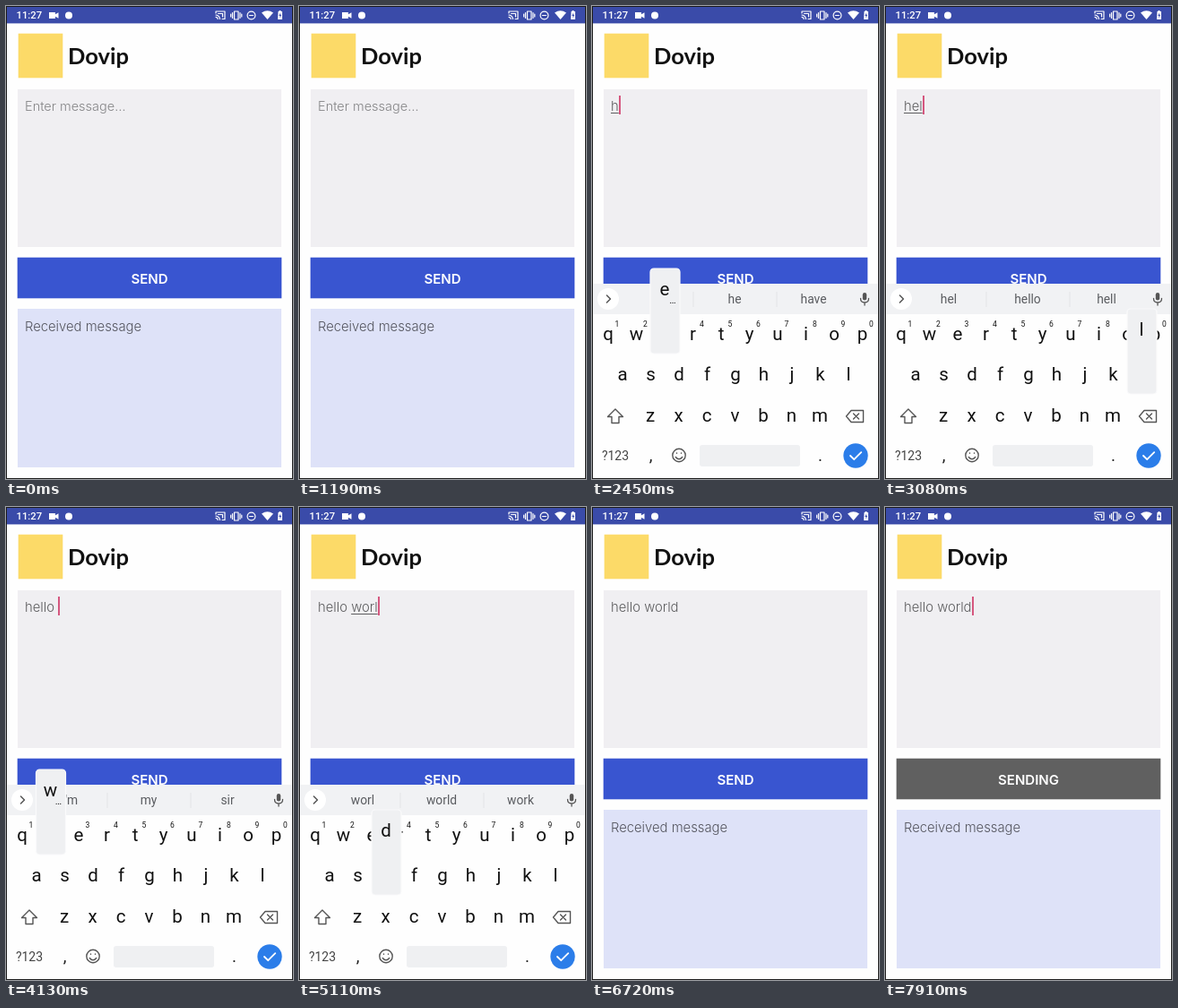
Animation of 320x528 px, one loop 8 s. Source, as an HTML page:

```html
<!DOCTYPE html>
<html lang="en">
<head>
<meta charset="utf-8">
<title>Message sender</title>
<style>
html, body { margin: 0; width: 100%; height: 100%; overflow: hidden; background: #fff; }
#stage { position: relative; width: 320px; height: 528px; overflow: hidden; background: #fefefe; }
svg { position: absolute; left: 0; top: 0; }
.app { font-family: Inter, sans-serif; font-size: 14.8px; font-weight: 300; }
#message { position: absolute; left: 21px; top: 102px; line-height: 20px; white-space: pre; color: #5c5c5e; }
#message u { text-underline-offset: 2px; text-decoration-thickness: 1px; }
#hint { position: absolute; left: 0; color: #858587; font-size: 14.5px; }
#caret { position: relative; }
#caret i { position: absolute; left: 0; top: -3px; width: 2px; height: 21px; background: #d5577f; }
.kb { font-family: Roboto, sans-serif; text-anchor: middle; }
.line { fill: none; stroke-linecap: round; stroke-linejoin: round; }
</style>
</head>
<body>
<div id="stage">
  <svg width="320" height="528">
    <rect width="320" height="19.400" fill="#3a4ba9"/>
    <text x="11.500" y="14" font-family="Roboto, sans-serif" font-size="11.300" font-weight="500" fill="#fff">11:27</text>
    <g fill="#fff">
      <path d="M48 7h7v2.300l3.500-2v6.400l-3.500-2v2.300h-7z"/>
      <circle cx="70" cy="10.500" r="4"/>
      <path d="M285 7.500q6.500-4.500 13 0L291.500 15z"/>
      <path d="M303.500 6h1V5h2v1h1.500v9h-5zM305.800 7.500l-1.500 3.500h1.200v2.500l1.700-3.700h-1.400z" fill-rule="evenodd"/>
    </g>
    <g class="line" stroke="#fff" stroke-width="1.200">
      <path d="M234 8V6h10v8.500h-3M234 10q4 .5 4.500 4.500M234 12.300q2 .2 2.200 2.200M236.500 8.500h5v3.500"/>
      <path d="M254.500 6h4.500v9h-4.500zM252.500 7.500v6M261 7.500v6M250.700 9v3M262.800 9v3"/>
      <circle cx="273.500" cy="10.500" r="4.400"/><path d="M271.500 10.500h4"/>
    </g>
    <rect x="13.700" y="30.700" width="49.600" height="49.600" fill="#fcda68"/>
    <text x="69" y="65" font-family="Lato, sans-serif" font-size="25.500" font-weight="700" fill="#111">Dovip</text>
    <rect x="13" y="93" width="294" height="176" fill="#f0eff2"/>
    <rect id="button" x="12.700" y="280.700" width="294.600" height="45.600"/>
    <text id="label" class="app" x="160" y="310" text-anchor="middle" style="font-weight:600;font-size:15px" fill="#fff"></text>
    <rect x="13" y="338" width="294" height="177" fill="#dee2f8"/>
    <text class="app" x="21" y="363" fill="#55565f">Received message</text>
  </svg>
  <div id="message" class="app"><span id="hint">Enter message…</span><span id="done"></span><u id="word"></u><span id="caret"><i></i></span></div>
  <svg width="320" height="528">
    <g id="keyboard" class="kb">
      <rect y="310" width="320" height="260" fill="#fefefe"/>
      <rect y="310" width="320" height="34" fill="#f1f2f4"/>
      <path d="M113 319v17M206 319v17" stroke="#e3e4e7"/>
      <circle cx="18" cy="327" r="12" fill="#fff"/>
      <path class="line" d="M16.500 323l4 4-4 4" stroke="#555" stroke-width="1.500"/>
      <rect x="301.800" y="320" width="4.400" height="8.500" rx="2.200" fill="#555"/>
      <path class="line" d="M299.500 326.500q0 4.500 4.500 4.500t4.500-4.500M304 331v3" stroke="#555" stroke-width="1.300"/>
      <g id="hints" font-size="13.800" fill="#5a5c60"></g>
      <g id="keys" font-size="20.500" fill="#111"></g>
      <g class="line" stroke="#555" stroke-width="1.400">
        <path d="M26 450l-8.500 8.500h4.500v7h8v-7h4.500z"/>
        <path d="M289 451.500h13.500v13H289l-5.500-6.500zM291.500 455l6 6M297.500 455l-6 6"/>
        <circle cx="97" cy="501.500" r="7.200"/>
        <path d="M93.300 503.500q3.700 4.500 7.400 0M94.500 499v.3M99.500 499v.3"/>
      </g>
      <text x="26" y="507" font-size="14" fill="#444">?123</text>
      <text x="65.500" y="508" font-size="19" fill="#222">,</text>
      <text x="254.500" y="508" font-size="19" fill="#222">.</text>
      <rect id="space" x="120" y="490" width="112" height="24" rx="3"/>
      <circle cx="294" cy="502" r="13.700" fill="#2b7de9"/>
      <path class="line" d="M288 502l4.200 4.200 8-8" stroke="#fff" stroke-width="1.800"/>
      <g id="popup" fill="#111">
        <rect x="-16" y="-73" width="33" height="95" rx="4" fill="#eff0f2" stroke="#fafafb" stroke-width="1.200"/>
        <text id="popupKey" y="-43" font-size="20.500"></text>
        <text id="popupDots" x="9" y="-34" font-size="11">…</text>
      </g>
    </g>
    <rect x=".5" y=".5" width="319" height="527" fill="none" stroke="#1c1c1c"/>
  </svg>
</div>
<script>
const LOOP = 8000, PITCH = 31.5, HOLD = 100;
const FOCUS = 1260, DISMISS = 5740, SEND = 7140;
const $ = id => document.getElementById(id);

// press time, key, suggestions once the key is released
const strokes = [
  [2030, 'h', 'h he have'],
  [2400, 'e', 'he hello hey'],
  [2720, 'l', 'hel hello hell'],
  [3050, 'l', 'hell hello hells'],
  [3400, 'o', 'hello hello. hellos'],
  [3760, ' ', "I'm my sir"],
  [4080, 'w', 'w we with'],
  [4350, 'o', 'wo would work'],
  [4600, 'r', 'wor work world'],
  [4820, 'l', 'worl world work'],
  [5060, 'd', 'world world_is would']
];
const rows = [['qwertyuiop', 18, 366], ['asdfghjkl', 34, 411], ['zxcvbnm', 65, 457]];
const places = {};

function addText(parent, x, y, text, size) {
  const node = document.createElementNS('http://www.w3.org/2000/svg', 'text');
  node.setAttribute('x', x);
  node.setAttribute('y', y);
  if (size) node.setAttribute('font-size', size);
  node.textContent = text;
  parent.append(node);
  return node;
}

rows.forEach(([letters, x0, y], row) => [...letters].forEach((key, i) => {
  const x = x0 + i * PITCH;
  places[key] = { x, y, row };
  addText($('keys'), x, y + 7, key);
  if (row === 0) addText($('keys'), x + 10, y - 8, (i + 1) % 10, 8.5);
}));
const hints = [71, 159, 247].map(x => addText($('hints'), x, 332, ''));

const ramp = (t, from, to) => Math.min(1, Math.max(0, (t - from) / (to - from)));

function drawKeyboard(t, suggestions) {
  const opening = ramp(t, FOCUS + 40, FOCUS + 240);
  const closing = ramp(t, 5870, 5996);
  const shift = 50 * (1 - opening) ** 2 + 47 * closing;
  $('keyboard').setAttribute('transform', `translate(0 ${shift})`);
  $('keyboard').setAttribute('opacity', opening * (1 - closing));
  suggestions.split(' ').forEach((s, i) => hints[i].textContent = s.replace('_', ' '));

  const held = strokes.find(([at]) => t >= at && t < at + HOLD);
  const place = held && places[held[1]];
  $('space').setAttribute('fill', held && !place ? '#d5d7da' : '#eff0f2');
  $('popup').style.display = place ? '' : 'none';
  if (place) {
    $('popup').setAttribute('transform', `translate(${place.x} ${place.y})`);
    $('popupKey').textContent = held[1];
    $('popupDots').style.display = place.row ? 'none' : '';
  }
}

function draw(t) {
  const typed = strokes.filter(([at]) => t >= at + HOLD);
  const last = typed[typed.length - 1];
  const text = typed.map(s => s[1]).join('');
  const split = t < DISMISS ? text.lastIndexOf(' ') + 1 : text.length;
  $('done').textContent = text.slice(0, split);
  $('word').textContent = text.slice(split);
  $('hint').style.display = text ? 'none' : '';

  const reset = t >= DISMISS ? DISMISS : last ? last[0] + HOLD : FOCUS;
  const lit = t >= FOCUS && (t - reset) % 1000 < 500;
  $('caret').style.visibility = lit ? 'visible' : 'hidden';

  const sending = t >= SEND;
  $('button').setAttribute('fill', sending ? '#606060' : '#3955d0');
  $('label').textContent = sending ? 'SENDING' : 'SEND';
  drawKeyboard(t, last ? last[2] : 'thanks I we');
}

const start = performance.now();
function tick() {
  draw((performance.now() - start) % LOOP);
  requestAnimationFrame(tick);
}
tick();
</script>
</body>
</html>
```
